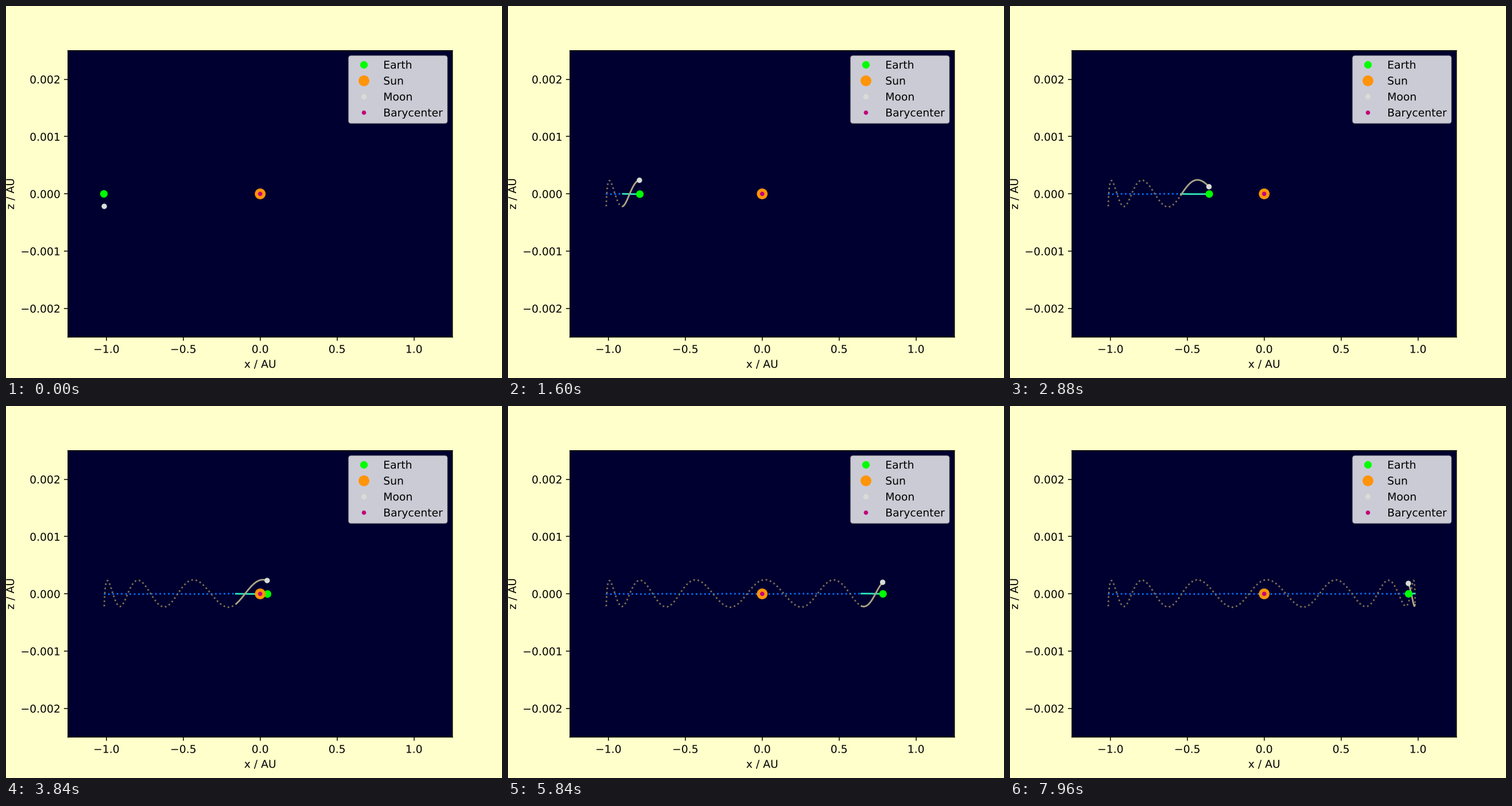
A matplotlib script that plays this animation: 864x648 px, repeating every 8 s.

```python
import numpy as np
import matplotlib.pyplot as plt
from matplotlib import patheffects
from matplotlib.animation import FuncAnimation

FRAMES, INTERVAL = 200, 40
TAIL = 12                       # days drawn as a solid trail
STEPS = 24                      # integration steps per day
STEP = 86400 / STEPS

AU = 1.495979e8                                      # km
GM = np.array([1.32712e11, 398600.4, 4902.8])        # Sun, Earth, Moon
TILT = np.radians(5.145)


def acceleration(pos):
    d = pos[None] - pos[:, None]
    r2 = (d ** 2).sum(axis=2) + np.eye(3)
    return (GM[None, :, None] * d / r2[..., None] ** 1.5).sum(axis=1)


def derivative(state):
    return np.array([state[1], acceleration(state[0])])


def rk4(state):
    k1 = derivative(state)
    k2 = derivative(state + STEP / 2 * k1)
    k3 = derivative(state + STEP / 2 * k2)
    k4 = derivative(state + STEP * k3)
    return state + STEP / 6 * (k1 + 2 * k2 + 2 * k3 + k4)


def simulate():
    """Positions per day, starting at aphelion with the Moon at perigee."""
    aphelion, perigee = 1.521e8, 363300.0
    pos = [[0, 0, 0],
           [-aphelion, 0, 0],
           [-aphelion + perigee * np.cos(TILT), 0, -perigee * np.sin(TILT)]]
    vel = [[0, 0, 0], [0, -29.29, 0], [0, -29.29 + 1.082, 0]]
    state = np.array([pos, vel], dtype=float)
    days = []
    for _ in range(FRAMES):
        center = GM @ state[0] / GM.sum()
        days.append((state[0] - center) / AU)
        for _ in range(STEPS):
            state = rk4(state)
    return np.array(days)


orbit = simulate()
earth, moon = orbit[:, 1, ::2].T, orbit[:, 2, ::2].T     # x and z only

# Smooth subpixel placement of lines, markers and text
plt.rcParams.update({"path.snap": False, "text.hinting": "no_hinting",
                     "path.effects": [patheffects.Normal()]})

fig, ax = plt.subplots(figsize=(6.4, 4.8), dpi=135, facecolor="#ffffcb")
ax.set_facecolor("#000030")
ax.set_xlim(-1.25, 1.25)
ax.set_ylim(-0.0025, 0.0025)
ax.set_xticks([-1, -0.5, 0, 0.5, 1])
ax.set_yticks([-0.002, -0.001, 0, 0.001, 0.002])
ax.set_xlabel("x / AU")
ax.set_ylabel("z / AU")


def trail(color, style):
    return ax.plot([], [], style, color=color, lw=1.5)[0]


def body(color, size, label):
    return ax.plot([0], [0], "o", color=color, ms=size, label=label)[0]


earth_old = trail("#0070ff", ":")
moon_old = trail("#7f7053", ":")
earth_new = trail("#2ee8bb", "-")
moon_new = trail("#ada587", "-")
earth_dot = body("#00ff00", 6, "Earth")
sun_dot = body("#ff9408", 9, "Sun")
moon_dot = body("#d8dcd6", 4, "Moon")
center_dot = body("#c20078", 3, "Barycenter")
ax.legend(loc="upper right", facecolor="white", framealpha=0.8)


def update(i):
    cut = max(0, i - TAIL)
    for path, old, new, dot in ((earth, earth_old, earth_new, earth_dot),
                                (moon, moon_old, moon_new, moon_dot)):
        old.set_data(path[:, :cut + 1])
        new.set_data(path[:, cut:i + 1])
        dot.set_data(path[:, i:i + 1])
    return earth_old, moon_old, earth_new, moon_new, earth_dot, moon_dot


anim = FuncAnimation(fig, update, frames=FRAMES, interval=INTERVAL,
                     init_func=lambda: update(0), repeat=True, repeat_delay=0)
plt.show()
```
